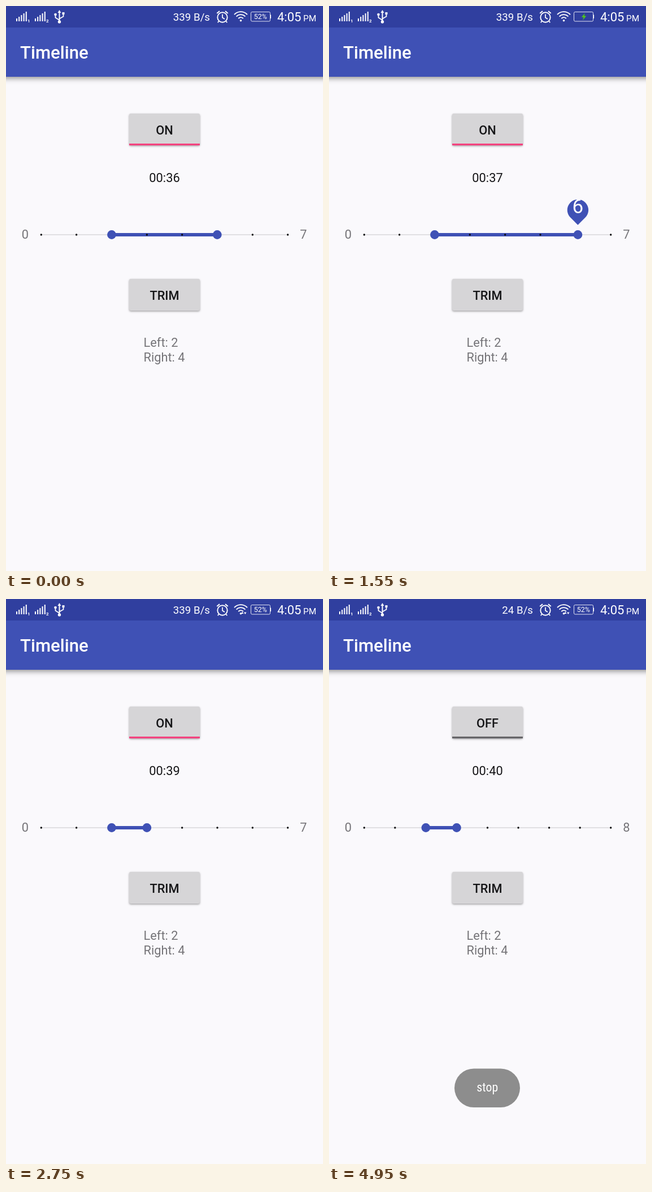
Write an HTML page with a canvas that moves like this. It is 561 px wide and 998 px high and loops after 5000 ms.

```html
<!DOCTYPE html>
<html lang="en">
<head>
<meta charset="utf-8">
<title>Timeline</title>
<style>
html, body { margin: 0; width: 100%; height: 100%; overflow: hidden; background: #faf9fc; }
canvas { display: block; }
</style>
</head>
<body>
<canvas id="stage" width="561" height="998"></canvas>
<script>
const ctx = document.getElementById('stage').getContext('2d');
const LOOP = 5000, STEP = 50;
const BLUE = '#3f51b5', WHITE = '#fff', INK = '#151517', GREY = '#757478';
const BAR_LEFT = 62.3, BAR_RIGHT = 498.7, BAR_Y = 404;
const PIN_TIME = 300;

// Press and release times with the finger's path as [time, x].
const DRAGS = [
  { press: 0, release: 600, path: [[150, 373.8], [300, 405], [480, 475], [580, 498.7]] },
  { press: 1150, release: 2430, path: [[1200, 498.7], [1350, 486], [1850, 372], [2300, 266], [2429, 252]] }
];

const clamp = v => Math.max(0, Math.min(1, v));
const ease = v => (1 - Math.cos(Math.PI * clamp(v))) / 2;
const tickX = (value, max) => BAR_LEFT + (BAR_RIGHT - BAR_LEFT) * value / max;

function along(path, t) {
  if (t <= path[0][0]) return path[0][1];
  for (let i = 1; i < path.length; i++) {
    const [t0, x0] = path[i - 1], [t1, x1] = path[i];
    if (t <= t1) return x0 + (x1 - x0) * (t - t0) / (t1 - t0);
  }
  return path[path.length - 1][1];
}

function text(str, x, y, size, color = INK, { weight = 400, align = 'left', family = 'Roboto', width = '' } = {}) {
  ctx.font = `${weight} ${width} ${size}px ${family}, sans-serif`;
  ctx.textAlign = align;
  ctx.fillStyle = color;
  ctx.fillText(str, x, y);
}

function rect(x, y, w, h, color) {
  ctx.fillStyle = color;
  ctx.fillRect(x, y, w, h);
}

function disc(x, y, r, color) {
  ctx.fillStyle = color;
  ctx.beginPath();
  ctx.arc(x, y, r, 0, 7);
  ctx.fill();
}

function polygon(points, color) {
  ctx.fillStyle = color;
  ctx.beginPath();
  points.forEach(([x, y]) => ctx.lineTo(x, y));
  ctx.fill();
}

function stroke(points, width, color = WHITE) {
  ctx.strokeStyle = color;
  ctx.lineWidth = width;
  ctx.beginPath();
  points.forEach(([x, y]) => ctx.lineTo(x, y));
  ctx.stroke();
}

function arc(x, y, r, from, to, width) {
  ctx.strokeStyle = WHITE;
  ctx.lineWidth = width;
  ctx.beginPath();
  ctx.arc(x, y, r, from, to);
  ctx.stroke();
}

function shadowed(color, blur, offset, draw) {
  ctx.save();
  ctx.shadowColor = color;
  ctx.shadowBlur = blur;
  ctx.shadowOffsetY = offset;
  draw();
  ctx.restore();
}

function signal(x, label) {
  for (let i = 0; i < 5; i++) {
    const h = 5 + 3 * i;
    rect(x + 4.2 * i, 27 - h, 2, h, WHITE);
  }
  text(label, x + 20, 29, 8, WHITE, { weight: 700 });
}

function usbIcon() {
  stroke([[94.5, 10], [94.5, 28]], 2);
  polygon([[91.5, 12], [94.5, 7], [97.5, 12]], WHITE);
  disc(94.5, 28, 2.7, WHITE);
  stroke([[94.5, 25], [87.5, 20.5], [87.5, 15]], 1.8);
  disc(87.5, 15, 2.3, WHITE);
  stroke([[94.5, 22.5], [101.5, 18.5], [101.5, 13]], 1.8);
  rect(99.5, 11, 4, 4, WHITE);
}

function alarmIcon() {
  arc(383, 20, 8.7, 0, 7, 1.9);
  stroke([[383, 14.5], [383, 20.5], [387, 23]], 1.7);
  stroke([[373.3, 13], [378, 9]], 2.2);
  stroke([[388, 9], [392.7, 13]], 2.2);
  stroke([[377, 26.5], [374.7, 29.3]], 1.8);
  stroke([[389, 26.5], [391.3, 29.3]], 1.8);
}

function wifiIcon(active) {
  for (const r of [5.8, 10.8, 15.8]) arc(415.5, 26, r, -Math.PI * 0.76, -Math.PI * 0.24, 1.8);
  disc(415.5, 25.7, 1.8, WHITE);
  if (active) {
    polygon([[416, 26], [418.3, 22.5], [420.5, 26]], WHITE);
    polygon([[421, 23.5], [425.5, 23.5], [423.3, 27]], WHITE);
  }
}

function batteryIcon(charging) {
  ctx.strokeStyle = 'rgba(255,255,255,.85)';
  ctx.lineWidth = 1;
  ctx.beginPath();
  ctx.roundRect(433.5, 10.5, 34, 16.5, 2);
  ctx.stroke();
  rect(468, 15.5, 1, 6.5, WHITE);
  if (charging) {
    polygon([[453, 12.5], [446.8, 19.8], [450.5, 19.8], [449, 25.2], [455.3, 17.6], [451.5, 17.6]], '#4fc71b');
  } else {
    text('52%', 450.3, 23.3, 12.5, WHITE, { align: 'center' });
  }
}

function header(t) {
  shadowed('rgba(0,0,0,.42)', 9, 3, () => rect(-20, 38, 601, 87, BLUE));
  rect(0, 0, 561, 38, '#303f9f');
  signal(18, '1');
  signal(51, '2');
  usbIcon();
  text(t < 3600 ? '339 B/s' : '24 B/s', 361, 26, 18.7, WHITE, { align: 'right' });
  alarmIcon();
  wifiIcon((t >= 2600 && t < 3600) || t >= 4150);
  batteryIcon((t + 2750) % 3000 < 1500);
  text('4:05', 480, 27, 22, WHITE);
  text('PM', 526, 27, 15.4, WHITE);
  text('Timeline', 25, 93, 31.2, WHITE, { weight: 500 });
}

function button(y, label) {
  shadowed('rgba(0,0,0,.36)', 3.5, 1.5, () => {
    ctx.fillStyle = '#d6d5d7';
    ctx.beginPath();
    ctx.roundRect(218, y, 125, 56, 3);
    ctx.fill();
  });
  text(label, 280.5, y + 36.5, 21.8, INK, { weight: 500, align: 'center' });
}

function pin(x, scale, value) {
  if (scale <= 0.01) return;
  ctx.save();
  ctx.beginPath();
  ctx.rect(0, 342, 561, 80);
  ctx.clip();
  ctx.translate(x, BAR_Y);
  ctx.scale(scale, scale);
  ctx.fillStyle = BLUE;
  ctx.beginPath();
  ctx.arc(0, -43.6, 18.7, Math.PI * 0.75, Math.PI * 2.25);
  ctx.lineTo(0, -17.2);
  ctx.fill();
  text(value, 0, -38.3, 35, WHITE, { align: 'center' });
  ctx.restore();
}

function rangeBar(t) {
  const max = t < 3500 ? 7 : 8;
  const drag = DRAGS[t < DRAGS[1].press ? 0 : 1];
  const left = tickX(2, max);
  const right = t < drag.release ? along(drag.path, t) : tickX(drag === DRAGS[0] ? 7 : 3, max);
  const scale = ease((t - drag.press) / PIN_TIME) * (1 - ease((t - drag.release) / PIN_TIME));

  text('0', 34, 410.5, 21.8, GREY, { align: 'center' });
  text(max, 526.5, 410.5, 21.8, GREY, { align: 'center' });
  rect(BAR_LEFT, BAR_Y - 0.5, BAR_RIGHT - BAR_LEFT, 1, '#c9c8cb');
  rect(left, BAR_Y - 3, right - left, 6, BLUE);
  for (let i = 0; i <= max; i++) disc(tickX(i, max), BAR_Y, 1.7, '#0b0b0d');
  disc(left, BAR_Y, 7.9, BLUE);
  disc(right, BAR_Y, 7.9, BLUE);
  pin(right, scale, Math.round((right - BAR_LEFT) / (BAR_RIGHT - BAR_LEFT) * max));
}

function toast(t) {
  const alpha = clamp((t - 4600) / 300);
  if (!alpha) return;
  ctx.save();
  ctx.globalAlpha = alpha;
  ctx.fillStyle = '#8d8d8d';
  ctx.beginPath();
  ctx.roundRect(222, 829.5, 116, 68.5, 34.25);
  ctx.fill();
  text('stop', 280.3, 870, 21.8, WHITE, { align: 'center', family: '"Roboto Condensed", Roboto', width: 'condensed' });
  ctx.restore();
}

function draw(t) {
  const on = t < 4450;
  const seconds = 36 + Math.min(4, Math.floor((t + 400) / 1000));
  rect(0, 0, 561, 998, '#faf9fc');
  header(t);
  button(190, on ? 'ON' : 'OFF');
  rect(218, 243, 125, 3.2, on ? '#f3437f' : '#666568');
  text('00:' + seconds, 280.5, 310.5, 21.8, INK, { align: 'center' });
  rangeBar(t);
  button(482, 'TRIM');
  text('Left: 2', 243.5, 602, 21.8, GREY);
  text('Right: 4', 243.5, 627.6, 21.8, GREY);
  toast(t);
}

function tick() {
  const t = performance.now() % LOOP;
  draw(Math.floor(t / STEP) * STEP);
  requestAnimationFrame(tick);
}
tick();
</script>
</body>
</html>
```
